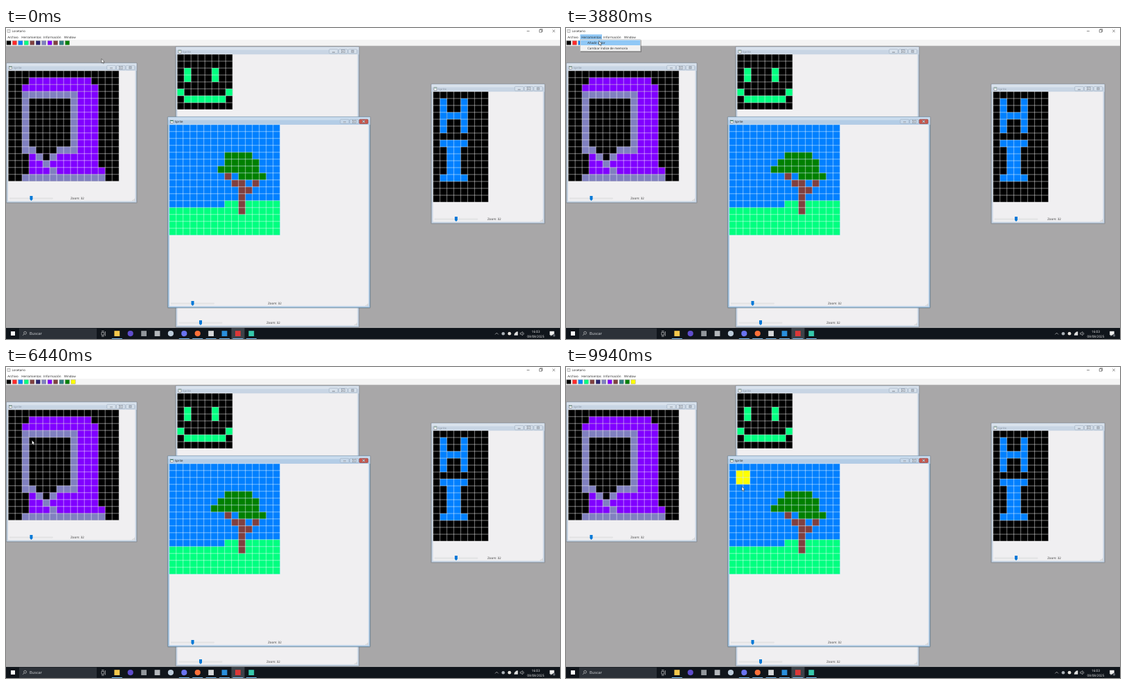
Recreate the animation shown at these times as an HTML page. Size 800 by 450 pixels, loop 10000 ms.

```html
<!DOCTYPE html>
<html lang="es">
<head>
<meta charset="utf-8">
<title>Editor de sprites</title>
<style>
html, body { margin: 0; width: 100%; height: 100%; overflow: hidden; background: #a8a7a8; }
svg { display: block; width: 100vw; height: 100vh; }
text { font-family: "Open Sans", "Noto Sans", sans-serif; text-rendering: geometricPrecision; }
.dlg text { font-family: "Liberation Sans", Arial, sans-serif; }
</style>
</head>
<body>
<svg id="stage" viewBox="0 0 800 450" preserveAspectRatio="none"></svg>
<script>
const NS = 'http://www.w3.org/2000/svg';
const stage = document.getElementById('stage');
const LOOP = 10000;

function add(parent, tag, attrs, content) {
  const el = document.createElementNS(NS, tag);
  for (const k in attrs) el.setAttribute(k, attrs[k]);
  if (content) el.textContent = content;
  parent.appendChild(el);
  return el;
}
const group = (p, attrs = {}) => add(p, 'g', attrs);
const rect = (p, x, y, width, height, fill, more = {}) =>
  add(p, 'rect', { x, y, width, height, fill, ...more });
const path = (p, d, stroke, w = 0.6, fill = 'none') =>
  add(p, 'path', { d, stroke, 'stroke-width': w, fill });
const dot = (p, cx, cy, r, fill) => add(p, 'circle', { cx, cy, r, fill });
const label = (p, x, y, str, size = 4.5, fill = '#222', anchor = 'start') =>
  add(p, 'text', { x, y, 'font-size': size, fill, 'text-anchor': anchor }, str);
const show = (el, on) => el.setAttribute('visibility', on ? 'visible' : 'hidden');

const C = {
  black: '#000', red: '#ff2a2a', blue: '#0080ff', mint: '#00ff80', brown: '#804040',
  navy: '#2a2670', lilac: '#8080c0', purple: '#8000ff', teal: '#2f8080',
  green: '#008000', yellow: '#ffff00'
};

// ---- main window
rect(stage, 0, 0, 800, 450, '#a8a7a8');
rect(stage, 0, 0, 800, 17, '#fff');
rect(stage, 0, 17, 800, 9, '#f4f4f4');
rect(stage, 0, 25.6, 800, 0.5, '#c4c4c4');

rect(stage, 2, 2.2, 4, 4.4, '#eee', { stroke: '#777', 'stroke-width': 0.5 });
const appTitle = label(stage, 8.5, 6.3, 'Losetario', 4.5);
const appButtons = path(stage,
  'M752 4.5h4M770.2 2.6h3.4v3.6h-3.4zM771.2 2.6v-.9h3.4v3.6h-1M789.2 2.6l3.6 3.6m0-3.6l-3.6 3.6', '#222', 0.5);

const menuHot = rect(stage, 20.5, 9.3, 31.5, 7.3, '#90c8f6');
[[2.2, 'Archivo'], [22.2, 'Herramientas'], [54, 'Información'], [83.8, 'Window']]
  .forEach(([x, s]) => label(stage, x, 14.7, s, 4.5));

const swatch = (i, fill) => rect(stage, 0.9 + i * 8.46, 18.5, 6.2, 6, fill,
  { stroke: '#777', 'stroke-width': 0.3 });
['black', 'red', 'blue', 'mint', 'brown', 'navy', 'lilac', 'purple', 'brown', 'teal', 'green']
  .forEach((c, i) => swatch(i, C[c]));
const newSwatch = swatch(11, C.yellow);
const hotSwatch = group(stage);
rect(hotSwatch, 93, 17.6, 8, 7.8, '#cfe6fa');
rect(hotSwatch, 94.2, 18.8, 5.6, 5.4, '#f1f6fb');

// ---- sprite windows
function titleBar(p, x, y, w, active) {
  const g = group(p);
  rect(g, x + 0.4, y + 0.4, w - 0.8, 11, active ? '#b3cce6' : '#c8d5e4');
  rect(g, x + 0.8, y + 0.8, w - 1.6, 4, '#fff', { opacity: 0.3 });
  rect(g, x + 4, y + 5, 4, 4.2, '#fff', { stroke: '#555', 'stroke-width': 0.5 });
  rect(g, x + 4.3, y + 5.3, 3.4, 1.1, active ? '#2e8b6a' : '#78a898');
  label(g, x + 10, y + 8.9, 'Sprite', 4.4, active ? '#222' : '#8d98a5');
  [37, 23.3, 9.5].forEach((off, i) => {
    const cx = x + w - off, cy = y + 6.8, close = active && i === 2;
    rect(g, cx - 6.3, cy - 3.1, 12.6, 6.2, close ? '#cd574c' : active ? '#c6d7e9' : '#d6e0eb',
      { rx: 1, stroke: close ? '#7d2a25' : '#92a2b4', 'stroke-width': 0.5 });
    const d = [
      `M${cx - 2} ${cy + 1}h4`,
      `M${cx - 1.9} ${cy - 1.5}h3.8v3h-3.8z`,
      `M${cx - 1.7} ${cy - 1.6}l3.4 3.2m0 -3.2l-3.4 3.2`
    ][i];
    path(g, d, '#59677a', 1.6);
    path(g, d, '#fff', 0.8);
  });
  return g;
}

function sprite(p, x, y, cols, rows, base, blocks) {
  const g = group(p, { transform: `translate(${x} ${y}) scale(10)` });
  rect(g, 0, 0, cols, rows, base);
  const cell = ([c, cx, cy, w = 1, h = 1]) => rect(g, cx, cy, w, h, C[c]);
  blocks.forEach(cell);
  const later = group(g);
  let d = '';
  for (let i = 0; i <= cols; i++) d += `M${i} 0V${rows}`;
  for (let j = 0; j <= rows; j++) d += `M0 ${j}H${cols}`;
  add(g, 'path', { d, stroke: '#fff', 'stroke-width': 0.065, 'stroke-opacity': 0.75, fill: 'none' });
  return (c, cx, cy) => rect(later, cx, cy, 1, 1, C[c]);
}

function frame(x, y, w, h, zoomX, active) {
  const g = group(stage);
  rect(g, x - 0.8, y - 0.8, w + 1.6, h + 1.6, '#000', { opacity: 0.1, rx: 1.5 });
  rect(g, x + 0.3, y + 0.3, w - 0.6, h - 0.6, active ? '#b3cce6' : '#c8d5e4',
    { rx: 1, stroke: active ? '#4b7691' : '#7f8fa0', 'stroke-width': 0.6 });
  titleBar(g, x, y, w, false);
  rect(g, x + 2.5, y + 11.2, w - 5, h - 13.7, '#f0eff1');
  const sy = y + h - 6.5, hx = x + 36;
  rect(g, x + 5, sy - 0.6, 62, 1.3, '#e5e5e6', { stroke: '#d2d2d3', 'stroke-width': 0.3 });
  path(g, `M${hx - 2} ${sy - 3.5}h4v5l-2 2l-2 -2z`, 'none', 0, '#0078d7');
  label(g, zoomX, sy + 1.6, 'Zoom: 32', 4.5, '#333', 'middle');
  for (let i = 0; i < 3; i++) for (let j = 0; j <= i; j++)
    rect(g, x + w - 4 - j * 1.3, y + h - 6.2 + i * 1.3, 0.7, 0.7, '#aaa');
  return g;
}

const ghost = frame(0.5, 50.5, 188.5, 202.5, 103);
sprite(ghost, 3.2, 61.8, 16, 16, '#000', [
  ['purple', 3, 1, 9], ['purple', 2, 2, 11], ['purple', 10, 3, 3, 11],
  ['lilac', 2, 3, 8], ['lilac', 2, 4, 1, 8], ['lilac', 9, 4, 1, 8],
  ['lilac', 3, 11], ['lilac', 7, 11, 2],
  ['purple', 3, 12, 10, 3], ['purple', 13, 14],
  ['lilac', 4, 12], ['black', 5, 12], ['lilac', 6, 12], ['lilac', 5, 13], ['lilac', 6, 14],
  ['lilac', 2, 15, 12]
]);

const smile = frame(245, 27, 265, 406, 386);
sprite(smile, 247.2, 38, 8, 8, '#000', [
  ['mint', 1, 2, 1, 2], ['mint', 5, 2, 1, 2], ['mint', 0, 5], ['mint', 7, 5], ['mint', 1, 6, 6]
]);

const hi = frame(614, 81, 164, 202, 705);
sprite(hi, 616.7, 92, 8, 16, '#000', [
  ['blue', 1, 1, 1, 5], ['blue', 4, 1, 1, 5], ['blue', 2, 3, 2],
  ['blue', 1, 7, 4], ['blue', 2, 8, 2, 4], ['blue', 1, 12, 4]
]);

const tree = frame(233.5, 128.5, 292.5, 276.5, 388, true);
const treeActive = titleBar(tree, 233.5, 128.5, 292.5, true);
const paint = sprite(tree, 235.7, 139.8, 16, 16, C.blue, [
  ['mint', 0, 12, 16, 4], ['mint', 8, 11, 8],
  ['green', 8, 4, 4], ['green', 8, 5, 5], ['green', 7, 6, 6], ['green', 10, 7, 4],
  ['brown', 8, 7], ['brown', 9, 8, 2], ['brown', 12, 8], ['brown', 10, 9, 2], ['brown', 10, 10, 1, 3]
]);
const strokes = [
  [1450, 'green', 7, 5], [1950, 'green', 6, 6],
  [8450, 'yellow', 1, 1], [8700, 'yellow', 2, 1], [8950, 'yellow', 2, 2], [9200, 'yellow', 1, 2]
].map(([at, ...cell]) => ({ at, el: paint(...cell) }));

// ---- drop-down menu
const menu = group(stage);
rect(menu, 21, 17.5, 88, 17.5, '#000', { opacity: 0.25 });
rect(menu, 20.3, 16.8, 87.4, 16.8, '#f2f2f2', { stroke: '#a5a5a5', 'stroke-width': 0.5 });
rect(menu, 21.2, 17.6, 85.8, 7.4, '#90c8f6');
label(menu, 31, 23, 'Añadir color');
label(menu, 31, 30.8, 'Cambiar índice de memoria');

// ---- colour dialog
const dialog = group(stage, { class: 'dlg' });
rect(dialog, 2, 17.5, 96.5, 128, '#000', { opacity: 0.2 });
rect(dialog, 3.3, 17.3, 93.4, 126.2, '#f0f0f0', { stroke: '#8c8c8c', 'stroke-width': 0.5 });
rect(dialog, 3.6, 17.6, 92.8, 10.6, '#fff');
label(dialog, 6.8, 24.6, 'Color', 4.5);
path(dialog, 'M88.4 21.2l3.4 3.4m0 -3.4l-3.4 3.4', '#333', 0.5);
label(dialog, 6.8, 35.4, 'Colores básicos', 4.1);
label(dialog, 6.8, 99.3, 'Colores personalizados', 4.1);
const slotX = i => 7.7 + i * 10.95, slotY = j => 39 + j * 8.4;
const basics = `ff8080 ffff80 80ff80 00ff80 80ffff 0080ff ff80c0 ff80ff
ff0000 ffff00 80ff00 00ff40 00ffff 0080c0 8080c0 ff00ff
804040 ff8040 00ff00 008080 004080 8080ff 800040 ff0080
800000 ff8000 008000 008040 0000ff 0000a0 800080 8000ff
400000 804000 004000 004040 000080 000040 400040 400080
000000 808000 808040 808080 408080 c0c0c0 400040 ffffff`;
const slot = (x, y, fill) => {
  rect(dialog, x, y, 8.2, 6, fill);
  path(dialog, `M${x} ${y + 6}V${y}h8.2`, '#777', 0.5);
  path(dialog, `M${x} ${y + 6}h8.2V${y}`, '#fff', 0.4);
};
basics.split(/\s+/).forEach((c, i) => slot(slotX(i % 8), slotY(i >> 3), '#' + c));
for (let i = 0; i < 16; i++) slot(slotX(i % 8), 103 + (i >> 3) * 8.3, '#fff');
const picked = rect(dialog, 0, 0, 9.6, 7.4, 'none', { stroke: '#111', 'stroke-width': 0.6 });
function button(x, y, w, str, focus) {
  rect(dialog, x, y, w, 7.6, '#e1e1e1',
    { stroke: focus ? '#0078d7' : '#adadad', 'stroke-width': focus ? 0.8 : 0.5 });
  label(dialog, x + w / 2, y + 5.3, str, 4.1, '#222', 'middle');
}
button(7, 123.2, 85.3, 'Definir colores personalizados >>');
button(7, 133.2, 26, 'Aceptar', true);
button(37.3, 133.2, 26, 'Cancelar');

// ---- taskbar
const bar = group(stage);
rect(bar, 0, 434, 800, 16, '#10151b');
rect(bar, 7, 439, 6, 6, '#fff');
rect(bar, 19, 434.6, 112, 15.4, '#2c3138');
add(bar, 'circle', { cx: 27.6, cy: 441.2, r: 1.9, fill: 'none', stroke: '#ddd', 'stroke-width': 0.6 });
path(bar, 'M26.2 442.7l-2 2.2', '#ddd');
label(bar, 34, 444.4, 'Buscar', 5.7, '#cfd2d5');
path(bar, 'M138 440.4h3.6v4h-3.6zM143.4 439v6.6M138 438.6h3.6M138 446.2h3.6', '#eee');
rect(bar, 325.5, 434, 19, 16, '#3c4249');
[['#f5c84c', 1, 1], ['#5f4dcc'], ['#92979c', 1], ['#b4b8bc', 1], ['#bccbda'], ['#6a74f0', 0, 1],
 ['#ff7139', 0, 1], ['#d5d7d9', 1, 1], ['#2a8fdc', 1, 1], ['#dc3838', 1, 1], ['#36c8ab', 1, 1]]
  .forEach(([fill, square, open], i) => {
    const x = 160.3 + i * 19.4;
    if (square) rect(bar, x - 3.9, 438.2, 7.8, 7.8, fill);
    else dot(bar, x, 442.1, 4.1, fill);
    if (open) rect(bar, x - 7.5, 449, 15, 1, '#76b9ed');
  });
path(bar, 'M706.3 443.4l2.3 -2.3l2.3 2.3', '#eee');
dot(bar, 718, 442.2, 2.3, '#aeb4ba');
dot(bar, 727, 442.2, 2.4, '#e6e2dc');
path(bar, 'M734 444.5a5 5 0 0 1 5 -5v5z', '#eee', 0.4, '#ddd');
path(bar, 'M742.6 441.2h1.5l1.8 -1.7v5.4l-1.8 -1.7h-1.5zM747.2 440.6q1.3 1.6 0 3.2', '#eee', 0.5);
label(bar, 765, 440.8, '16:03', 4.7, '#eee', 'middle');
label(bar, 765, 447.7, '08/08/2025', 4.7, '#eee', 'middle');
path(bar, 'M785.4 439h6v5h-3l-1.5 1.6v-1.6h-1.5z', '#eee', 0.5, '#eee');
dot(bar, 791.3, 444.8, 2.1, '#4a5058');
label(bar, 791.3, 446, '1', 3, '#fff', 'middle');

// ---- pointer
const pointer = path(stage, 'M0 0v6.2l1.4 -1.2l1 2.1l1 -.5l-1 -2h1.8z', '#111', 0.45, '#fff');
const track = [
  [0, 138, 44.5], [250, 138, 44.5], [1200, 309, 195], [1630, 306.5, 197.5], [1950, 301, 204],
  [2250, 301, 204], [2900, 36, 12], [3150, 36, 12], [3500, 47.5, 18.5], [4150, 47.5, 18.5],
  [4750, 66, 55.5], [5150, 23, 49], [5400, 23, 49], [5800, 18, 133], [6200, 18, 133],
  [6950, 98, 22], [7450, 98, 22], [8300, 250, 154], [8500, 251, 155], [8700, 260, 156],
  [8950, 260, 165], [9200, 251, 165], [9550, 254, 173], [LOOP, 254, 173]
];
const ease = u => u * u * (3 - 2 * u);
function pointerAt(t) {
  const i = track.findIndex(k => k[0] > t);
  const [t0, x0, y0] = track[i - 1], [t1, x1, y1] = track[i];
  const u = ease((t - t0) / (t1 - t0));
  return [x0 + (x1 - x0) * u, y0 + (y1 - y0) * u];
}

function draw(t) {
  const asking = t >= 4150 && t < 6150;
  const menuOpen = t >= 2950 && t < 4150;
  const hover = t >= 6900 && t < 7520;
  show(menu, menuOpen);
  show(menuHot, menuOpen);
  show(dialog, asking);
  show(treeActive, !asking);
  show(newSwatch, t >= 6150 && !hover);
  show(hotSwatch, hover);
  appTitle.setAttribute('fill', asking ? '#999' : '#222');
  appButtons.setAttribute('stroke', asking ? '#999' : '#222');
  const [col, row] = t < 5250 ? [0, 5] : [1, 1];
  picked.setAttribute('x', slotX(col) - 0.7);
  picked.setAttribute('y', slotY(row) - 0.7);
  strokes.forEach(s => show(s.el, t >= s.at));
  pointer.setAttribute('transform', `translate(${pointerAt(t)})`);
}

const start = performance.now();
function tick() {
  draw((performance.now() - start) % LOOP);
  requestAnimationFrame(tick);
}
tick();
</script>
</body>
</html>
```
